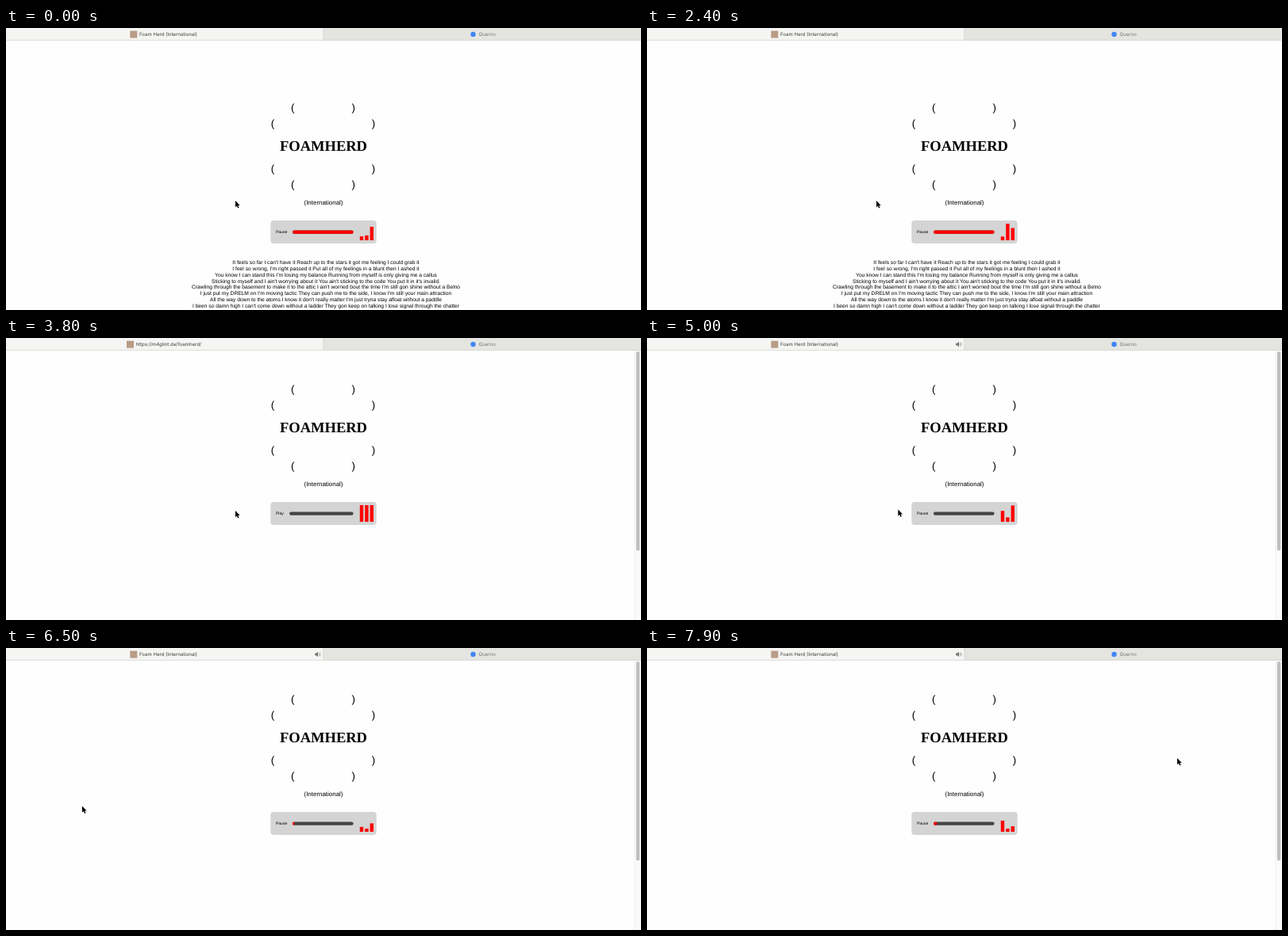
Write an HTML page that moves like this. It is 800 px wide and 356 px high and loops after 8000 ms.

```html
<!DOCTYPE html>
<html lang="en">
<head>
<meta charset="utf-8">
<title>Foam Herd</title>
<style>
  html, body { margin: 0; width: 100%; height: 100%; overflow: hidden; background: #fefefe; }
  svg { display: block; width: 800px; height: 356px; }
  text { font-family: "Liberation Sans", Arial, sans-serif; text-rendering: geometricPrecision; fill: #000; }
  .mid { text-anchor: middle; }
  .tab { font: 6.05px Inter, sans-serif; fill: #3c3c3c; }
  .dim { fill: #777; }
  .paren { font-size: 13.3px; }
  .logo { font: bold 18.5px "Liberation Serif", serif; }
  .sub { font-size: 7.95px; }
  .label { font-size: 5.1px; }
  .lyrics text { font-size: 6.68px; }
</style>
</head>
<body>
<svg viewBox="0 0 800 356">
  <rect width="800" height="356" fill="#fefefe"/>

  <g id="page">
    <g id="parens"></g>
    <text class="logo mid" x="400" y="119">FOAMHERD</text>
    <text class="sub mid" x="400" y="187.2">(International)</text>
    <rect x="333.3" y="207" width="133.4" height="29" rx="4" fill="#d4d4d4"/>
    <text class="label" id="label" x="339.9" y="223.2">Play</text>
    <rect id="track" y="219.4" height="4.4" rx="2.2" fill="#444"/>
    <rect id="fill" x="361" y="219.4" height="4.4" rx="2.2" fill="#f00"/>
    <g id="bars" fill="#f00"></g>
    <g id="lyrics" class="lyrics"></g>
  </g>

  <g id="scroll">
    <rect x="792" y="16" width="8" height="340" fill="#fafafa"/>
    <path d="M792 16V356" stroke="#e8e8e8" stroke-width=".6"/>
    <rect x="793.9" y="17" width="4.4" height="251.5" rx="2.2" fill="#bfbfbf"/>
  </g>

  <rect width="400" height="15.5" fill="#f5f5f3"/>
  <rect x="400" width="400" height="15.5" fill="#e4e5e1"/>
  <path d="M0 15.4H800M399.8 0V15" stroke="#d2d2d0" stroke-width=".7"/>
  <rect id="icon" y="3.6" width="9" height="9" fill="#b99c86"/>
  <text class="tab" id="title" y="10.2"></text>
  <circle cx="588.5" cy="8" r="3.2" fill="#4285f4"/>
  <text class="tab dim" x="595.6" y="10.2">Querno</text>
  <g id="sound" fill="#777">
    <path d="M389 6.7h1.5L393 4.7v6.6l-2.5-2H389z"/>
    <path d="M394 6.5q.9 1.5 0 3M395.4 5.5q1.6 2.5 0 5" fill="none" stroke="#777" stroke-width=".6"/>
  </g>

  <path id="cursor" d="M0 0V8.3L1.9 6.6 3.2 9.4 4.5 8.8 3.3 6.1H5.7Z" fill="#000" stroke="#fff" stroke-width=".7" paint-order="stroke"/>
</svg>

<script>
const $ = id => document.getElementById(id);

function add(parent, tag, attrs, text = "") {
  const el = document.createElementNS("http://www.w3.org/2000/svg", tag);
  for (const k in attrs) el.setAttribute(k, attrs[k]);
  el.textContent = text;
  return parent.appendChild(el);
}

function set(el, attrs) {
  for (const k in attrs) el.setAttribute(k, attrs[k]);
}

const show = (id, on) => set($(id), { visibility: on ? "visible" : "hidden" });

const LYRICS = [
  "It feels so far I can't have it Reach up to the stars it got me feeling I could grab it",
  "I feel so wrong, I'm right passed it Put all of my feelings in a blunt then I ashed it",
  "You know I can stand this I'm losing my balance Running from myself is only giving me a callus",
  "Sticking to myself and I ain't worrying about it You ain't sticking to the code You put it in it's invalid.",
  "Crawling through the basement to make it to the attic I ain't worried bout the time I'm still gon shine without a Belno",
  "I just put my DRELM on I'm moving tactic They can push me to the side, I know I'm still your main attraction",
  "All the way down to the atoms I know it don't really matter I'm just tryna stay afloat without a paddle",
  "I been so damn high I can't come down without a ladder They gon keep on talking I lose signal through the chatter"
];
LYRICS.forEach((line, i) =>
  add($("lyrics"), "text", { class: "mid", x: 403, y: 262.2 + i * 7.78 }, line));

// Half-distance from the centre and baseline of each bracket pair
for (const [dx, y] of [[38.3, 69], [63.5, 89], [63.5, 145.7], [38.3, 165.7]]) {
  add($("parens"), "text", { class: "paren mid", x: 399.5 - dx, y }, "(");
  add($("parens"), "text", { class: "paren mid", x: 399.5 + dx, y }, ")");
}

// Each bar: angular speed, phase before the reload, phase after it
const BARS = [[14.2, -2.35, 0], [4.54, 2.5, -4.2], [7.4, -0.85, -7.35]];
const bars = BARS.map((_, i) => add($("bars"), "rect", { x: 445.8 + i * 6.4, width: 4.4 }));

// Time, x, y
const PATH = [
  [0, 289, 218], [3900, 289, 218], [4400, 346, 219], [4800, 346, 219],
  [5700, 111, 199.3], [5900, 111, 199.3], [6600, 95, 199.5],
  [7100, 90.4, 199.8], [7500, 90, 199.8], [7900, 668, 139], [8000, 668, 139]
];

const LOOP = 8000, RELOAD = 3300, LOADED = 3800, TITLED = 4000, PLAY = 4900;

function cursorAt(t) {
  const i = PATH.findIndex(p => p[0] > t);
  const [t0, x0, y0] = PATH[i - 1], [t1, x1, y1] = PATH[i];
  const u = (t - t0) / (t1 - t0), e = u * u * (3 - 2 * u);
  return `translate(${x0 + (x1 - x0) * e} ${y0 + (y1 - y0) * e})`;
}

function barHeight([speed, before, after], t) {
  if (t >= LOADED && t < PLAY) return 21;
  const late = t >= PLAY;
  const s = late ? (t - PLAY) / 1000
    : t < 1600 ? Math.min(t, 200) / 10000 - 0.02
    : (t - 1600) / 1000;
  return 12.5 + 8.5 * Math.cos((late ? after : before) + speed * s);
}

function draw(t) {
  const first = t < RELOAD, loaded = t >= LOADED, playing = t >= PLAY;
  const active = first || playing;
  const url = loaded && t < TITLED;

  set($("page"), { transform: `translate(0 ${first ? 36 : 0})`, display: first || loaded ? "inline" : "none" });
  set($("lyrics"), { display: first ? "inline" : "none" });
  show("scroll", loaded);
  show("sound", playing);

  $("title").textContent = url ? "https://m4glint.de/foamherd/" : "Foam Herd (International)";
  set($("title"), { x: url ? 163.4 : 168 });
  set($("icon"), { x: url ? 152 : 156.3 });

  $("label").textContent = active ? "Pause" : "Play";
  const left = active ? 361 : 357;
  set($("track"), { x: left, width: 437.6 - left });
  set($("fill"), { width: first ? 76.6 : playing ? (t - PLAY) * 0.0015 : 0 });

  bars.forEach((bar, i) => {
    const h = barHeight(BARS[i], t);
    set(bar, { y: 232 - h, height: h });
  });
  set($("cursor"), { transform: cursorAt(t) });
}

function tick() {
  draw(Math.floor(performance.now() % LOOP / 100) * 100);
  requestAnimationFrame(tick);
}
tick();
</script>
</body>
</html>
```
